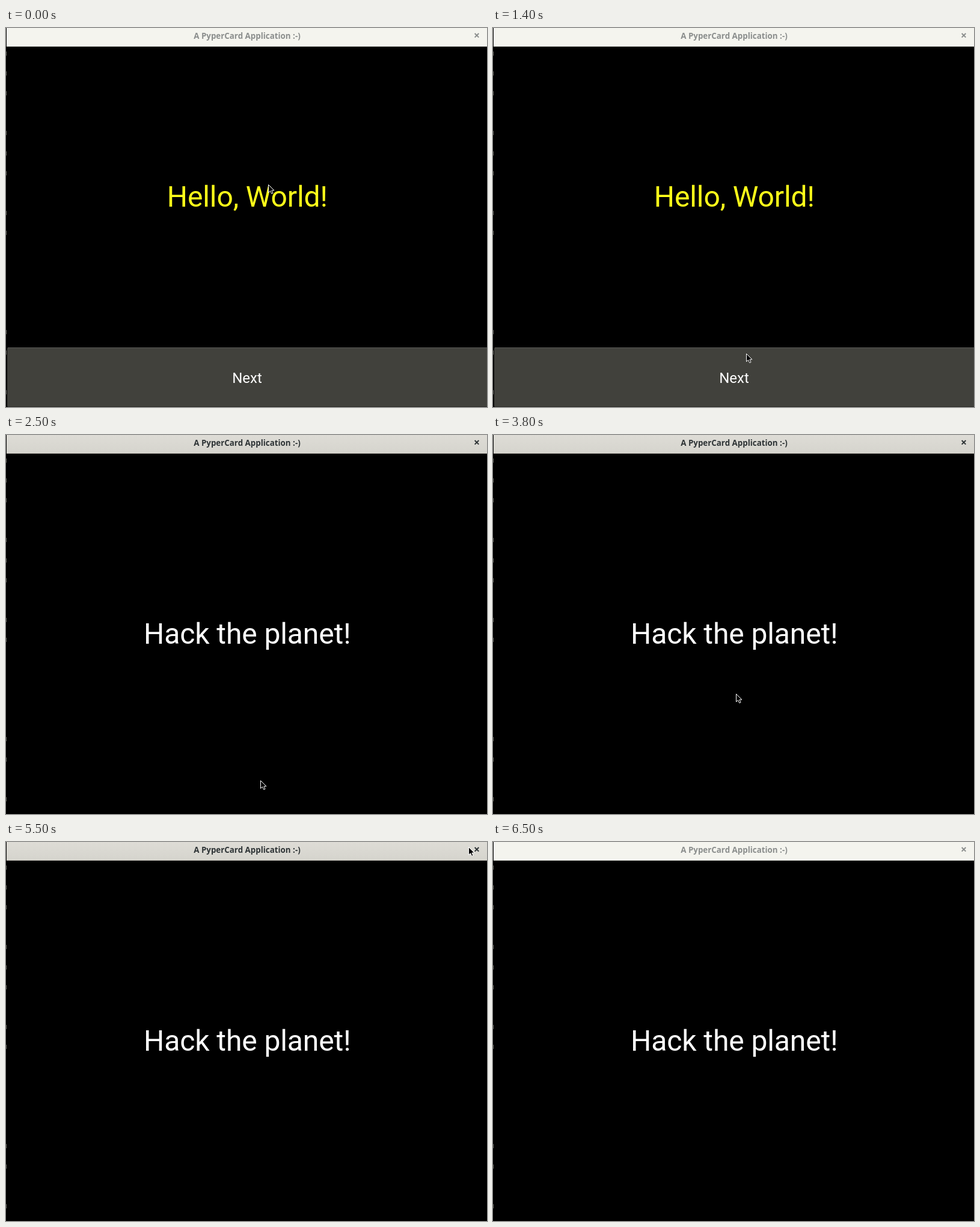
Animation of 800 by 630 pixels, one loop 6.6 s. Source, as an HTML page:

```html
<!DOCTYPE html>
<html lang="en">
<head>
<meta charset="utf-8">
<title>Card demo</title>
<style>
  html, body { margin: 0; width: 100%; height: 100%; overflow: hidden; background: #000; }
  svg { display: block; width: 800px; height: 630px; }
  text { text-anchor: middle; font-family: Roboto, sans-serif; }
  .big { font-size: 48px; letter-spacing: -0.1px; }
  .title { font: 700 13.35px "Noto Sans", sans-serif; }
</style>
</head>
<body>
<svg viewBox="0 0 800 630">
  <defs>
    <linearGradient id="sheen" x1="0" y1="0" x2="0" y2="1">
      <stop offset="0" stop-color="#dedcd6"/>
      <stop offset="1" stop-color="#d5d4cd"/>
    </linearGradient>
    <!-- Fill, stroke and ink colour come from each use of the bar. -->
    <g id="bar">
      <rect x="1" width="799" height="31" stroke="none"/>
      <path d="M1 30.5 H800"/>
      <text class="title" x="401" y="18" fill="currentColor" stroke="none">A PyperCard Application :-)</text>
      <path d="M779.7 9 l6.6 6.6 m0 -6.6 l-6.6 6.6" fill="none" stroke="currentColor" stroke-width="2"/>
    </g>
  </defs>
  <rect width="800" height="630"/>
  <path id="edge" stroke="#62625c"/>

  <use href="#bar" fill="url(#sheen)" stroke="#bfbbb4" color="#2e3436"/>
  <use id="idleBar" href="#bar" fill="#f4f4ee" stroke="#d8dad2" color="#8b8e8d"/>

  <g id="first">
    <text class="big" x="401.3" y="297" fill="#ffff19">Hello, World!</text>
    <rect x="2" y="531" width="800" height="99" rx="2" fill="#41413c"/>
    <path d="M3 531.5 H800" stroke="#595955"/>
    <path d="M3 629.5 H800" stroke="#2b2b28"/>
    <text x="401" y="590" font-size="24" fill="#fff">Next</text>
  </g>
  <g id="second">
    <text class="big" x="401.3" y="347" fill="#fff">Hack the planet!</text>
  </g>

  <path id="cursor" d="M.5 .5 V13.5 L3.5 10.8 L5.8 15.5 L8 14.5 L5.9 10 H10 Z"
        fill="#000" stroke="#fff" stroke-linejoin="round"/>
</svg>
<script>
const LOOP = 6600, STEP = 100;
const $ = id => document.getElementById(id);
const mix = (a, b, k) => a + (b - a) * k;
const clamp = k => Math.min(1, Math.max(0, k));
const smooth = k => k * k * (3 - 2 * k);
const easeOut = k => 1 - (1 - k) ** 2;

// Each leg is a Bezier curve that begins where the one before it ended.
const home = [436, 260];
const legs = [
  { from: 400, to: 1200, ease: smooth, curve: [[335, 381], [418, 508]] },
  { from: 1200, to: 1600, ease: smooth, curve: [[423, 574]] },
  { from: 3400, to: 3600, ease: smooth, curve: [[404, 430]] },
  { from: 3900, to: 4600, ease: smooth, curve: [[803, 550], [258, 200], [332, 132]] },
  { from: 4600, to: 5300, ease: easeOut, curve: [[634, -3], [785, 9]] },
  { from: 5400, to: 5500, ease: smooth, curve: [[769, 8]] },
  { from: 5500, to: 5600, ease: smooth, curve: [[590, 30]] }
];

function bezier(points, k) {
  if (points.length === 1) return points[0];
  const next = points.slice(1).map(([x, y], i) =>
    [mix(points[i][0], x, k), mix(points[i][1], y, k)]);
  return bezier(next, k);
}

function pointer(t) {
  return legs.reduce((spot, { from, to, ease, curve }) =>
    bezier([spot, ...curve], ease(clamp((t - from) / (to - from)))), home);
}

// Text lines of a window behind show as specks along the left edge.
const emptyLines = [3, 7, 10, 11, 12, 13, 16];
let specks = "";
for (let line = 0; line < 18; line++) {
  if (!emptyLines.includes(line)) specks += `M.5 ${39 + Math.round(line * 33.1)} v7`;
}
$("edge").setAttribute("d", specks);

function show(id, visible) {
  $(id).style.display = visible ? "" : "none";
}

function draw(now) {
  const t = Math.floor((now % LOOP) / STEP) * STEP;
  const onFirst = t < 2500;
  show("first", onFirst);
  show("second", !onFirst);
  show("cursor", t < 6400);
  $("idleBar").setAttribute("opacity", onFirst ? 1 : clamp((t - 6300) / 200));
  const [x, y] = pointer(t).map(Math.round);
  $("cursor").setAttribute("transform", `translate(${x} ${y})`);
}

const start = performance.now();
function tick() {
  draw(performance.now() - start);
  requestAnimationFrame(tick);
}
tick();
</script>
</body>
</html>
```
